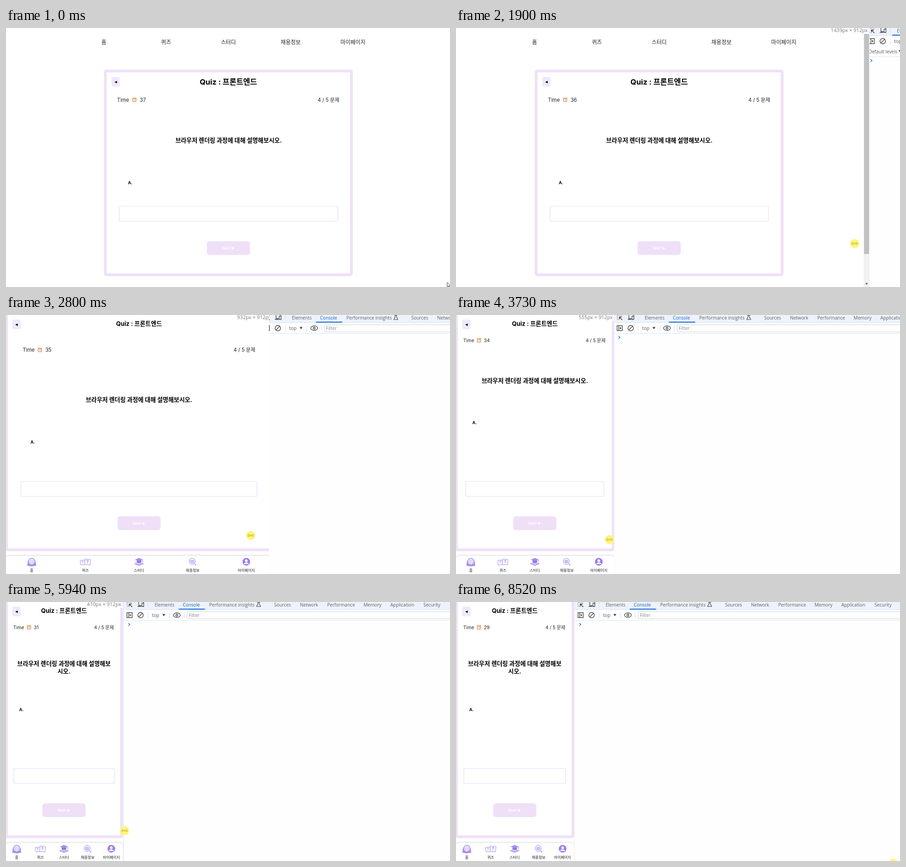
These frames come from a looping animation (978 px wide and 572 px high, 8590 ms). An HTML page with a canvas:

```html
<!DOCTYPE html>
<html lang="ko">
<head>
<meta charset="utf-8">
<title>Responsive quiz</title>
<style>
html, body { margin: 0; height: 100%; overflow: hidden; background: #fff; }
canvas { display: block; }
</style>
</head>
<body>
<canvas id="stage" width="978" height="572"></canvas>
<script>
const g = document.getElementById('stage').getContext('2d');
const LOOP = 8590, VIEW_W = 978, VIEW_H = 572;
const PAGE = 'Inter, "Noto Sans CJK KR", "Noto Sans CJK", sans-serif';
const HANGUL = '"Noto Sans CJK KR", "Noto Sans CJK", sans-serif';
const TOOLS = '"Open Sans", "Noto Sans", sans-serif';
const LILAC = '#efe0f8', VIOLET = '#a78bf0', INK = '#222', GREY = '#5a5d62', BLUE = '#0b63ce';
const NAV = ['홈', '퀴즈', '스터디', '채용정보', '마이페이지'];
const QUESTION = '브라우저 렌더링 과정에 대해 설명해보시오.';

// [time, viewport width in CSS px]
const WIDTHS = [[1190, 1573], [1500, 1530], [1890, 1439], [1925, 1439], [1960, 1425], [2030, 1330], [2800, 932],
  [2860, 889], [3730, 555], [3790, 551], [4740, 422], [5010, 410], [5940, 410], [6160, 415]];
// [time, x, y] of the dragging pointer
const DRAG = [[1220, 982, 471], [1500, 945, 473], [1900, 878, 476], [2030, 800, 478], [2800, 539, 487],
  [3730, 338, 496], [4740, 266, 504], [5010, 261, 505], [5940, 261, 505], [6160, 263.5, 505]];
const TABS = [['Elements', 69], ['Console', 131], ['Performance insights', 189], ['Sources', 332],
  ['Network', 389], ['Performance', 449], ['Memory', 529], ['Application', 588], ['Security', 661]];

function at(keys, t, col = 1) {
  if (t <= keys[0][0]) return keys[0][col];
  for (let i = 1; i < keys.length; i++) {
    const a = keys[i - 1], b = keys[i];
    if (t < b[0]) return a[col] + (b[col] - a[col]) * (t - a[0]) / (b[0] - a[0]);
  }
  return keys[keys.length - 1][col];
}

const isDesktop = css => css > 1024;
const toStage = css => css * 0.633 - (isDesktop(css) ? 0 : 2);
const edgeAt = t => toStage(at(WIDTHS, t));

function text(s, x, y, size, { color = INK, weight = 400, align = 'left', font = PAGE } = {}) {
  g.font = `${weight} ${size}px ${font}`;
  g.textAlign = align;
  g.fillStyle = color;
  g.fillText(s, x, y + size * 0.365);
}

function box(x, y, w, h, fill, r = 0) {
  g.fillStyle = fill;
  g.beginPath();
  g.roundRect(x, y, w, h, r);
  g.fill();
}

function outline(x, y, w, h, color, r = 0, lw = 1) {
  g.strokeStyle = color;
  g.lineWidth = lw;
  g.beginPath();
  g.roundRect(x, y, w, h, r);
  g.stroke();
}

function poly(pts, fill, stroke, lw = 1) {
  g.beginPath();
  pts.forEach(([x, y]) => g.lineTo(x, y));
  if (fill) { g.closePath(); g.fillStyle = fill; g.fill(); }
  if (stroke) { g.strokeStyle = stroke; g.lineWidth = lw; g.stroke(); }
}

function disc(x, y, r, fill, stroke, lw = 1) {
  g.beginPath();
  g.arc(x, y, r, 0, 7);
  if (fill) { g.fillStyle = fill; g.fill(); }
  if (stroke) { g.strokeStyle = stroke; g.lineWidth = lw; g.stroke(); }
}

function place(x, y, draw) {
  g.save();
  g.translate(x, y);
  draw();
  g.restore();
}

function clock() {
  poly([[-2.5, 3.5], [-3.6, 5.2]], null, '#c9703f');
  poly([[2.5, 3.5], [3.6, 5.2]], null, '#c9703f');
  disc(-3.4, -3.4, 1.4, '#eda552');
  disc(3.4, -3.4, 1.4, '#eda552');
  disc(0, 0.4, 3.9, '#fff', '#dc7a45', 1.3);
  poly([[0, -1.8], [0, 0.7], [1.7, 0.7]], null, '#8a5a48', 0.8);
}

const navIcons = [
  () => {
    disc(0, -0.5, 7.2, '#efe8fe', VIOLET, 1.5);
    outline(-4.5, -3.5, 9, 6.5, '#d2c0fa', 3);
    box(-9, -1, 2.5, 6, VIOLET, 1);
    box(6.5, -1, 2.5, 6, VIOLET, 1);
    disc(-2, 0, 0.8, VIOLET);
    disc(2, 0, 0.8, VIOLET);
    poly([[-10, 5], [-5, 4.5], [0, 6.5], [5, 4.5], [10, 5], [9, 9], [0, 10], [-9, 9]], VIOLET);
  },
  () => {
    g.save(); g.rotate(-0.08); outline(-11, -4, 10, 10, VIOLET, 1); g.restore();
    g.save(); g.rotate(0.08); box(-1, -6, 12, 12, '#fff', 1); outline(-1, -6, 12, 12, VIOLET, 1); g.restore();
    text('?', -6, 1, 8, { color: VIOLET, weight: 700, align: 'center' });
    text('?', 5, 0, 10, { color: VIOLET, weight: 700, align: 'center' });
  },
  () => {
    poly([[-10, 3], [0, 0], [10, 3], [0, 7]], '#cdbaf8');
    poly([[-10, 4], [0, 8], [10, 4]], null, VIOLET, 1.4);
    box(-5, -4, 10, 6, '#8d6fe0', 2);
    poly([[-9, -4.5], [0, -8.5], [9, -4.5], [0, -1]], VIOLET);
    poly([[8, -4.5], [8, 1]], null, VIOLET);
  },
  () => {
    disc(-1, -1, 6.8, '#f4efff', VIOLET, 1);
    outline(-4.5, -3, 7, 5, VIOLET, 1);
    disc(-1, -0.5, 1.5, null, VIOLET);
    poly([[4, 4], [7.5, 8]], null, VIOLET, 1.6);
  },
  () => {
    disc(0, 0, 8.5, '#9f7df0');
    disc(0, -2.3, 2.9, '#fff');
    g.beginPath();
    g.ellipse(0, 5, 5.3, 3.5, 0, Math.PI, 0);
    g.fillStyle = '#fff';
    g.fill();
  }
];

function backButton(x, y) {
  box(x, y, 18.5, 21.5, '#f1e8fd', 4);
  poly([[x + 6.5, y + 11.5], [x + 12, y + 8.7], [x + 12, y + 14.3]], '#000');
}

function nextButton(c, y) {
  box(c - 47.5, y, 95, 30.5, LILAC, 6);
  text('Next', c - 14, y + 15.5, 8, { color: '#fff', weight: 600 });
  poly([[c + 7.5, y + 12.5], [c + 13.5, y + 15.7], [c + 7.5, y + 19]], '#fff');
}

function status(left, right, y, size, count) {
  const k = size / 11.2;
  text('Time', left, y, size);
  place(left + 38 * k, y, clock);
  text(count, left + 50 * k, y, size);
  text('4 / 5 문제', right, y, size, { align: 'right' });
}

function question(c, y, room) {
  const size = 13.15;
  g.font = `700 ${size}px ${PAGE}`;
  let cut = QUESTION.length;
  while (cut > 1 && g.measureText(QUESTION.slice(0, cut)).width > room) cut--;
  const lines = [QUESTION.slice(0, cut), QUESTION.slice(cut)].filter(Boolean);
  lines.forEach((s, i) => text(s, c, y + (i - (lines.length - 1) / 2) * 17, size,
    { color: '#000', weight: 700, align: 'center' }));
}

const heading = (c, y, size) =>
  text('Quiz : 프론트엔드', c, y, size, { color: '#000', weight: 700, align: 'center' });
const answerMark = (x, y) => text('A.', x, y, 9, { color: '#000', weight: 700 });

function desktopPage(edge, count) {
  const c = (edge - 16) / 2;
  NAV.forEach((s, i) => text(s, c + (i - 2) * 137.2, 32, 12, { align: 'center', font: HANGUL }));
  outline(c - 271, 95, 542, 450, LILAC, 2, 6);
  backButton(c - 257.5, 108);
  heading(c, 119, 16.5);
  status(c - 245, c + 244.5, 158.5, 11.2, count);
  question(c + 0.5, 248, 480);
  answerMark(c - 221, 341.5);
  outline(c - 240.5, 393.5, 481.5, 33, '#e9dcf7', 2.5, 1.2);
  nextButton(c, 470.7);
  box(edge - 13, 0, 13, VIEW_H, '#f1f1f1');
  box(edge - 12, 13, 11, 486, '#c1c1c1');
  poly([[edge - 9.5, 563.5], [edge - 3.5, 563.5], [edge - 6.5, 567]], '#505050');
}

function mobilePage(edge, css, count) {
  const c = (edge - 2) / 2, w = c * 2, phone = css < 768;
  outline(1, -40, edge - 4, 558.5, LILAC, 2, 6);
  backButton(13.8, 10);
  heading(c, 19, 13.2);
  if (phone) status(16, w - 18, 56, 10.2, count);
  else status(36.7, w - 36.7, 77, 11.2, count);
  question(c, phone ? 145 : 187, w - 47);
  answerMark(9.7 + 0.0756 * w, phone ? 238 : 280.5);
  const m = 4.7 + 0.0483 * w;
  outline(m, 367.5, w - 2 * m, 33, '#e9dcf7', 2.5, 1.2);
  nextButton(c, 444.5);

  g.save();
  g.shadowColor = 'rgba(0,0,0,.22)';
  g.shadowBlur = 5;
  box(-1, 532, edge + 1, 60, '#fff', 8);
  g.restore();
  NAV.forEach((s, i) => {
    const x = c + (i - 2) * (0.4 * c + 1);
    place(x, 545, navIcons[i]);
    text(s, x, 564, 8.2, { align: 'center', font: HANGUL });
  });
}

function sizeLabel(edge, css, alpha) {
  g.globalAlpha = alpha;
  box(edge - 84, 0, 84, 12.5, '#fff');
  text(`${Math.round(css)}px × 912px`, edge - 4, 4.5, 11.1, { color: '#777', align: 'right', font: TOOLS });
  g.globalAlpha = 1;
}

function devtools(x) {
  const narrow = x > 700, label = { color: GREY, font: TOOLS };
  const vline = (dx, y, h) => box(x + dx, y, 1, h, '#d5dff0');
  box(x, 0, VIEW_W, VIEW_H, '#fefefe');
  box(x, 0, VIEW_W, 16.5, '#eef3fb');
  box(x, 16, VIEW_W, 1, '#d3e1f8');
  box(x, narrow ? 63 : 40, VIEW_W, 1, '#d8e4f8');

  // element picker and device icons
  g.setLineDash([1.5, 1.5]);
  outline(x + 8.5, 1, 10, 9, GREY);
  g.setLineDash([]);
  box(x + 13, 5, 8, 8, '#eef3fb');
  poly([[x + 13, 9.5], [x + 13, 4.5], [x + 18, 4.5]], null, '#333', 1.4);
  poly([[x + 13, 4.5], [x + 19.5, 11]], null, '#333', 1.4);
  outline(x + 34, -1, 11, 9, '#444', 0, 1.3);
  box(x + 40, 2, 6, 9, '#eef3fb');
  outline(x + 41, 2.5, 4, 7.5, '#444', 0, 1.3);
  box(x + 31.5, 9, 8, 1.5, '#444');
  vline(54, 0, 12);

  if (narrow) {
    text('Elements', x + 69, 6, 10.1, label);
    box(x + 59, 14.8, 60, 2, BLUE);
    text('Default levels', x + 7, 52, 10.1, label);
    poly([[x + 73, 49], [x + 79, 49], [x + 76, 54]], '#444');
  } else {
    TABS.forEach(([s, dx], i) => text(s, x + dx, 6, 10.1, { color: i === 1 ? BLUE : GREY, font: TOOLS }));
    box(x + 122, 14.8, 58, 2, BLUE);
    const f = x + 298;
    poly([[f - 1.5, 0], [f - 1.5, 4], [f - 4.5, 10], [f + 4.5, 10], [f + 1.5, 4], [f + 1.5, 0]], null, '#444', 1.2);
    poly([[f - 3, 0.5], [f + 3, 0.5]], null, '#444', 1.2);
  }

  // console toolbar
  outline(x + 8, 23.5, 11.5, 11, '#444', 0, 1.4);
  box(x + 11, 24, 1.3, 10, '#444');
  poly([[x + 14, 26], [x + 17.5, 29], [x + 14, 32]], '#444');
  disc(x + 38, 29, 6, null, '#444', 1.4);
  poly([[x + 42, 25], [x + 34, 33]], null, '#444', 1.4);
  vline(54, 23, 13);
  text('top', x + 63, 29.5, 10.4, label);
  poly([[x + 86, 26.5], [x + 92.5, 26.5], [x + 89.2, 31.5]], '#444');
  if (!narrow) {
    vline(101.5, 23, 13);
    g.beginPath();
    g.ellipse(x + 118, 29, 7.5, 5, 0, 0, 7);
    g.strokeStyle = '#444';
    g.lineWidth = 1.4;
    g.stroke();
    disc(x + 118, 29, 2.2, null, '#444', 1.4);
    vline(134, 23, 13);
    outline(x + 140.5, 21.5, VIEW_W, 15.5, '#cfd3da', 3);
    text('Filter', x + 144, 29.5, 10.2, { color: '#85898f', font: TOOLS });
  }
  const y = narrow ? 72 : 49.5;
  poly([[x + 11, y - 3], [x + 14.3, y], [x + 11, y + 3]], null, '#1a73e8', 1.4);
  box(x - 0.5, 0, 1, VIEW_H, '#d3e1f8');
}

const halo = (x, y) => disc(x, y, 10, '#fef774');

function resizePointer(x, y) {
  halo(x, y);
  poly([[x - 7.5, y], [x - 4.5, y - 2.7], [x - 4.5, y - 0.9], [x + 4.5, y - 0.9], [x + 4.5, y - 2.7], [x + 7.5, y],
    [x + 4.5, y + 2.7], [x + 4.5, y + 0.9], [x - 4.5, y + 0.9], [x - 4.5, y + 2.7], [x - 7.5, y]],
  '#fff6a8', '#a88d3c', 0.7);
}

function arrow(x, y) {
  poly([[x, y], [x, y + 9.5], [x + 2.2, y + 7.6], [x + 3.8, y + 10.5], [x + 5, y + 9.8], [x + 3.8, y + 7],
    [x + 6.5, y + 6.6], [x, y]], '#fff', '#333', 0.9);
}

function pointer(t) {
  const show = (x, y) => { halo(x, y); arrow(x, y); };
  if (t < 70) arrow(971.8, 562);
  else if (t >= 1220 && t < 6460) resizePointer(at(DRAG, t), at(DRAG, t, 2));
  else if (t >= 6700 && t < 6900) show(274, 515);
  else if (t >= 7780 && t < 7990) show(741, 552);
  else if (t >= 8520) show(963, 577);
}

function counter(t) {
  if (t < 880) return 37;
  return t < 1960 ? 36 : 35 - Math.floor((t - 1960) / 995);
}

function draw(t) {
  const css = at(WIDTHS, t), edge = toStage(css);
  g.clearRect(0, 0, VIEW_W, VIEW_H);
  // the tool panel runs slightly ahead of the page while dragging
  devtools(edgeAt(t + 60));
  g.save();
  g.beginPath();
  g.rect(0, 0, edgeAt(t + 20), VIEW_H);
  g.clip();
  box(0, 0, VIEW_W, VIEW_H, '#fff');
  if (isDesktop(css)) desktopPage(edge, counter(t));
  else mobilePage(edge, css, counter(t));
  const alpha = t < 1220 ? 0 : Math.max(0, Math.min(1, (7710 - t) / 810));
  if (alpha) sizeLabel(edge, css, alpha);
  g.restore();
  pointer(t);
}

let start;
function frame(now) {
  start ??= now;
  draw((now - start) % LOOP);
  requestAnimationFrame(frame);
}
requestAnimationFrame(frame);
</script>
</body>
</html>
```
